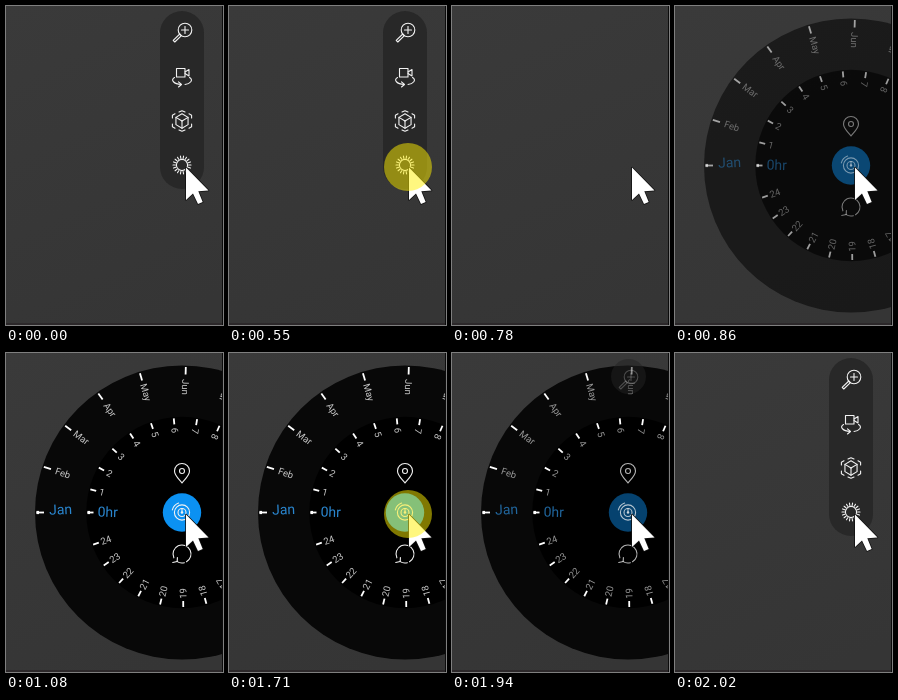
Recreate the animation shown at these times as an HTML page with a canvas. Size 217x319 px, loop 2250 ms.

```html
<!DOCTYPE html>
<html lang="en">
<head>
<meta charset="utf-8">
<title>Time dial</title>
<style>
html, body { margin: 0; width: 100%; height: 100%; overflow: hidden; background: #363636; }
canvas { display: block; width: 217px; height: 319px; }
</style>
</head>
<body>
<canvas id="stage" width="217" height="319"></canvas>
<script>
const ctx = document.getElementById('stage').getContext('2d');
const LOOP = 2250;
const CX = 176, CY = 159.5;
const FONT = 'Roboto, "Open Sans", sans-serif';
const MONTHS = ['Jan', 'Feb', 'Mar', 'Apr', 'May', 'Jun', 'Jul'];

// Each state holds until the next one starts
const STATES = [
  { t: 0, bar: 1 },
  { t: 550, bar: 1, click: 0.5 },
  { t: 620, bar: 1, click: 0.25 },
  { t: 700, bar: 0.45 },
  { t: 780 },
  { t: 860, dial: 0.6, ink: 0.8, glow: 0.75 },
  { t: 930, dial: 1, ink: 1, glow: 1 },
  { t: 1710, dial: 1, ink: 1, glow: 1, click: 0.5 },
  { t: 1790, dial: 1, ink: 1, glow: 1, click: 0.25 },
  { t: 1870, dial: 1, ink: 0.95, glow: 0.85 },
  { t: 1940, dial: 1, ink: 0.75, glow: 0.46, lens: 0.5 },
  { t: 2020, bar: 1 }
];

function disc(x, y, r, fill) {
  ctx.beginPath();
  ctx.arc(x, y, r, 0, Math.PI * 2);
  ctx.fillStyle = fill;
  ctx.fill();
}

function ring(x, y, r, from = 0, to = 360) {
  ctx.beginPath();
  ctx.arc(x, y, r, from * Math.PI / 180, to * Math.PI / 180);
  ctx.stroke();
}

function line(points, close) {
  ctx.beginPath();
  points.forEach(([x, y]) => ctx.lineTo(x, y));
  if (close) ctx.closePath();
  ctx.stroke();
}

function at(x, y, draw) {
  ctx.save();
  ctx.translate(x, y);
  ctx.strokeStyle = '#f2f2f2';
  ctx.lineWidth = 1.1;
  ctx.lineCap = ctx.lineJoin = 'round';
  draw();
  ctx.restore();
}

function background() {
  const g = ctx.createLinearGradient(0, 0, 150, 319);
  g.addColorStop(0, '#3a3a3a');
  g.addColorStop(1, '#353535');
  ctx.fillStyle = g;
  ctx.fillRect(0, 0, 217, 319);
}

function edges() {
  ctx.fillStyle = '#2c282a';
  ctx.fillRect(0, 317, 217, 2);
  ctx.fillStyle = '#0b0b0b';
  ctx.fillRect(216, 0, 1, 319);
}

function magnifier() {
  ring(3, -3, 6.8);
  line([[-0.5, -3], [6.5, -3]]);
  line([[3, -6.5], [3, 0.5]]);
  line([[-2.2, 1], [-8.8, 7.3], [-7.2, 9], [-0.6, 2.6]], true);
}

function camera() {
  ctx.strokeRect(-5.5, -8.5, 8.5, 8.5);
  line([[3, -5], [7, -7.5], [7, -1], [3, -3.5]]);
  ctx.beginPath();
  ctx.moveTo(-7.5, 0.5);
  ctx.bezierCurveTo(-12, 3, -8, 7, -1, 7.5);
  ctx.moveTo(7.5, 0.5);
  ctx.bezierCurveTo(12, 3, 8, 7, 3, 7.5);
  ctx.stroke();
  line([[-3.5, 4.8], [-0.5, 7.5], [-3.5, 10]]);
}

function cube() {
  const p = [0, 1, 2, 3, 4, 5].map(i => {
    const a = (i * 60 - 90) * Math.PI / 180;
    return [7 * Math.cos(a), 7.3 * Math.sin(a)];
  });
  line(p, true);
  [1, 3, 5].forEach(i => line([[0, 0], p[i]]));
  for (const sy of [-1, 1]) {
    line([[-3, sy * 9], [0, sy * 10.3], [3, sy * 9]]);
    for (const sx of [-1, 1])
      line([[sx * 7, sy * 7.2], [sx * 9.6, sy * 5.8], [sx * 9.6, sy * 3]]);
  }
}

function sun() {
  ring(0, 0, 5.6);
  for (let i = 0; i < 18; i++) {
    const a = i * Math.PI / 9, c = Math.cos(a), s = Math.sin(a);
    line([[6.6 * c, 6.6 * s], [9 * c, 9 * s]]);
  }
}

function toolbar(alpha) {
  ctx.save();
  ctx.globalAlpha = alpha;
  ctx.fillStyle = '#282828';
  ctx.beginPath();
  ctx.roundRect(154, 5, 44, 178, 22);
  ctx.fill();
  [magnifier, camera, cube, sun].forEach((icon, i) => at(176, 27 + 44 * i, icon));
  ctx.restore();
}

function pin() {
  ctx.beginPath();
  ctx.moveTo(0, 10);
  ctx.bezierCurveTo(-3, 6, -7.5, 2.5, -7.5, -2);
  ctx.arc(0, -2, 7.5, Math.PI, 0);
  ctx.bezierCurveTo(7.5, 2.5, 3, 6, 0, 10);
  ctx.stroke();
  ring(0, -2, 2.5);
}

function clock() {
  ring(0, 0, 7.6);
  ring(0, 0, 4);
  ring(0, 0, 10, 195, 250);
  line([[0, -4], [0, 0]]);
  disc(0, 0, 1.3, '#f2f2f2');
}

function reset() {
  ring(0, 0, 9, -205, 60);
  ring(0, 0, 9, 75, 125);
  line([[-9.3, 8.5], [-4.8, 7.5], [-4.6, 3.5]]);
}

function text(str, size, color) {
  ctx.font = size + 'px ' + FONT;
  ctx.fillStyle = color;
  ctx.fillText(str, 0, 0.5);
}

// Tick plus label along a spoke; 0 degrees points left
function spoke(deg, tickIn, tickOut, labelR, label, ink) {
  ctx.save();
  ctx.translate(CX, CY);
  ctx.rotate(deg * Math.PI / 180);
  ctx.fillStyle = '#fff';
  ctx.fillRect(-tickOut, -0.9, tickOut - tickIn, 1.8);
  if (deg === 0) ctx.fillRect(-tickOut, -1.6, 2.5, 3.2);
  ctx.globalAlpha *= ink;
  ctx.translate(-labelR, 0);
  if (deg !== 0) text(label, 9.5, '#c8c8c8');
  ctx.restore();
}

function dial(s) {
  ctx.save();
  ctx.globalAlpha = s.dial;
  disc(CX, CY, 147, '#080808');
  disc(CX, CY, 95.7, '#000');
  ctx.textAlign = 'center';
  ctx.textBaseline = 'middle';
  MONTHS.forEach((m, i) => spoke(i * 18.3, 138, 145.5, 125.5, m, s.ink));
  for (let h = 0; h <= 24; h++)
    spoke(h * 14.17, 88.5, 94.5, h > 12 ? 81 : 82.5, h, s.ink);
  ctx.globalAlpha = s.dial * s.ink;
  at(54.5, 156.7, () => { ctx.rotate(-0.04); text(MONTHS[0], 14, '#2a86cf'); });
  at(101.7, 159.2, () => { ctx.rotate(0.03); text('0hr', 14, '#2a86cf'); });
  at(176, 120, pin);
  at(176, 201, reset);
  ctx.globalAlpha = s.dial * s.glow;
  disc(176, CY, 19.2, '#0b91f2');
  ctx.globalAlpha = s.dial * s.ink;
  at(176, CY, clock);
  ctx.restore();
}

function lens(alpha) {
  ctx.save();
  ctx.globalAlpha = alpha;
  disc(176.5, 23.5, 17.5, '#222');
  ctx.globalAlpha = alpha / 2;
  at(176, 27, magnifier);
  ctx.restore();
}

function cursor() {
  const p = [[180, 161.5], [180, 194], [187, 187.5], [192, 198],
             [196.7, 196], [192.3, 185.3], [202.5, 184.5]];
  ctx.lineWidth = 1.6;
  ctx.lineJoin = 'round';
  ctx.strokeStyle = '#111';
  line(p, true);
  ctx.fillStyle = '#fff';
  ctx.fill();
}

function render(t) {
  const s = STATES.findLast(state => state.t <= t);
  background();
  if (s.bar) toolbar(s.bar);
  if (s.dial) dial(s);
  if (s.lens) lens(s.lens);
  edges();
  cursor();
  if (s.click) disc(179, 161, 24, `rgba(255, 240, 0, ${s.click})`);
}

const start = performance.now();
function tick() {
  render((performance.now() - start) % LOOP);
  requestAnimationFrame(tick);
}
tick();
</script>
</body>
</html>
```
